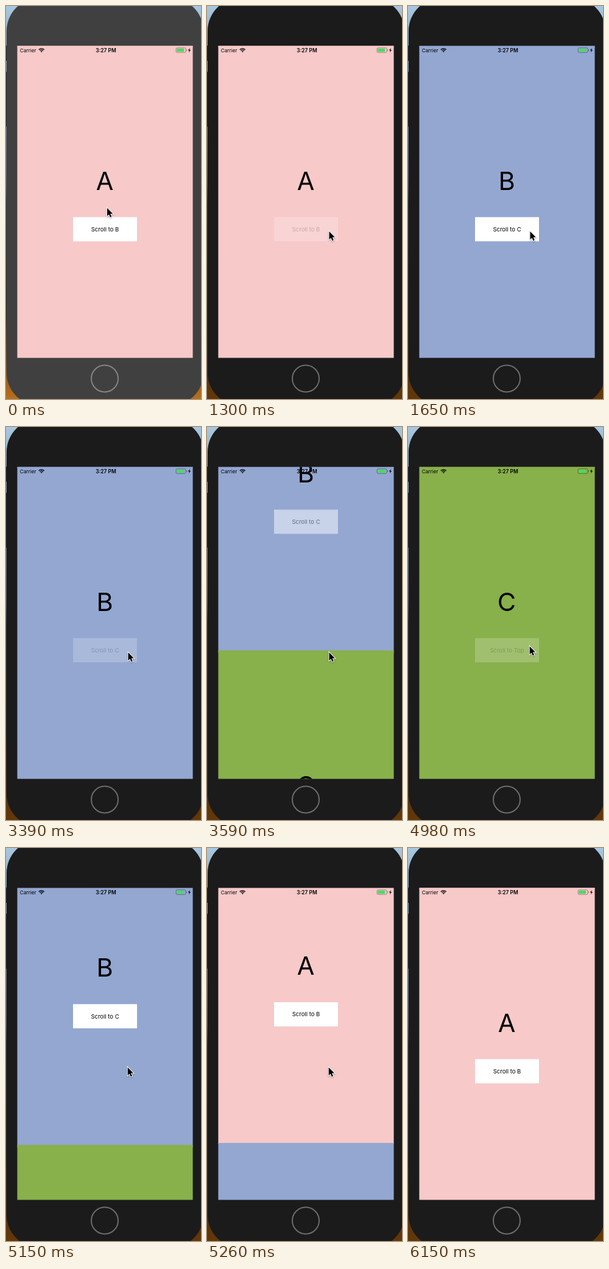
Write an HTML page with a canvas that moves like this. It is 320 px wide and 645 px high and loops after 6990 ms.

```html
<!DOCTYPE html>
<html lang="en">
<head>
<meta charset="utf-8">
<title>Scroll to page</title>
<style>
html, body { margin: 0; width: 100%; height: 100%; overflow: hidden; background: #1b1b1b; }
canvas { display: block; width: 320px; height: 645px; }
</style>
</head>
<body>
<canvas id="stage"></canvas>
<script>
const W = 320, H = 645, LOOP = 6990;
const STEP = 60;
const SCROLL_MS = 322;
const SCREEN = { x: 18.5, y: 65.5, w: 288, h: 512 };
const MID = SCREEN.x + SCREEN.w / 2;
const FONT = 'Inter, "Liberation Sans", sans-serif';

const PAGES = [
  { letter: 'A', label: 'Scroll to B', color: '#f7c9c9' },
  { letter: 'B', label: 'Scroll to C', color: '#93a7d1' },
  { letter: 'C', label: 'Scroll to Top', color: '#88b04b' }
];

// Tapping a page's button scrolls to the next page, wrapping at the end
const TAPS = [
  { press: 1300, end: 1650 },
  { press: 3390, end: 3730 },
  { press: 4980, end: 5320 }
];

const POINTER_START = { x: 166, y: 331.5 };
const POINTER_GONE = 6150;
const MOVES = [
  { start: 0, end: 640, x: 200.5, y: 364 },
  { start: 760, end: 940, x: 200.5, y: 370 },
  { start: 4090, end: 4210, x: 189, y: 395.5, power: 0.6 },
  { start: 4210, end: 4450, x: 199.7, y: 360 },
  { start: 5740, end: 6090, x: 298, y: 618.5, power: 1.7 }
];

const ARROW = new Path2D('M0 0V13.2L3 10.4 5 15.2 7.3 14.2 5.2 9.6H9.3Z');
const BOLT = new Path2D('M302 68.8L298.8 73H300.8L299.8 76.4 303 71.9H301Z');

const canvas = document.getElementById('stage');
const ctx = canvas.getContext('2d');
const dpr = window.devicePixelRatio || 1;
canvas.width = W * dpr;
canvas.height = H * dpr;

const clamp = v => Math.max(0, Math.min(1, v));
const lerp = (a, b, k) => a + (b - a) * k;
const smooth = k => k * k * (3 - 2 * k);

// Motion advances in even steps that land exactly on its end
function progress(t, start, end) {
  const left = Math.max(0, Math.ceil((end - t) / STEP - 0.05)) * STEP;
  return clamp((end - left - start) / (end - start));
}

function scrollAt(t) {
  return TAPS.reduce((pos, { end }, i) => {
    const next = (i + 1) % PAGES.length;
    return lerp(pos, next, smooth(progress(t, end - SCROLL_MS, end)));
  }, 0);
}

function buttonAlpha(page, t) {
  const { press } = TAPS[page];
  return t < press ? 1 : lerp(0.2, 1, clamp((t - press - 110) / 250));
}

function pointerAt(t) {
  return MOVES.reduce((p, { start, end, x, y, power = 1 }) => {
    const k = progress(t, start, end) ** power;
    return { x: lerp(p.x, x, k), y: lerp(p.y, y, k) };
  }, POINTER_START);
}

function rect(color, x, y, w, h) {
  ctx.fillStyle = color;
  ctx.fillRect(x, y, w, h);
}

function text(str, x, y, size, align = 'center', weight = 400) {
  ctx.font = `${weight} ${size}px ${FONT}`;
  ctx.textAlign = align;
  ctx.fillStyle = '#000';
  ctx.fillText(str, x, y);
}

function drawBackdrop(dark) {
  const g = ctx.createLinearGradient(0, 0, 0, H);
  g.addColorStop(0, '#a8c8e0');
  g.addColorStop(0.1, '#8fa5bc');
  g.addColorStop(0.45, '#5c5f6c');
  g.addColorStop(0.5, '#35343a');
  g.addColorStop(0.78, '#332a22');
  g.addColorStop(1, dark ? '#643808' : '#b8701a');
  rect(g, 0, 0, W, H);
  rect('#24252a', 0, 65, 2, 25);
  rect('#24252a', 0, 108, 2, 90);
}

function drawDevice(dark) {
  ctx.fillStyle = dark ? '#1b1b1b' : '#404040';
  ctx.beginPath();
  ctx.roundRect(1, -13, 323, 669, 54);
  ctx.fill();
  ctx.strokeStyle = dark ? '#6c6c6c' : '#858585';
  ctx.lineWidth = 2;
  ctx.beginPath();
  ctx.arc(162, 611.5, 22, 0, 7);
  ctx.stroke();
}

function drawPage(i, top, t) {
  const page = PAGES[i];
  // Bleeds past the clip so the screen edge is blended only once
  rect(page.color, 0, i ? top : top - 2, W, SCREEN.h + 4);
  text(page.letter, MID - 0.5, top + 236.2, 41.5);
  ctx.globalAlpha = buttonAlpha(i, t);
  rect('#fff', 110, top + 281, 105, 39.7);
  text(page.label, MID, top + 304.4, 9.5);
  ctx.globalAlpha = 1;
}

function drawWifi(x, y) {
  const arc = r => ctx.arc(x, y, r, -Math.PI * 0.76, -Math.PI * 0.24);
  ctx.strokeStyle = ctx.fillStyle = '#000';
  ctx.lineWidth = 1.3;
  for (const r of [3.8, 6.2]) {
    ctx.beginPath();
    arc(r);
    ctx.stroke();
  }
  ctx.beginPath();
  ctx.moveTo(x, y);
  arc(2.2);
  ctx.fill();
}

function drawBattery() {
  ctx.strokeStyle = 'rgba(0,0,0,.45)';
  ctx.lineWidth = 0.8;
  ctx.beginPath();
  ctx.roundRect(279, 68.7, 16, 7.6, 1.8);
  ctx.stroke();
  rect('#4cd964', 280.2, 69.9, 11.8, 5.2);
  rect('rgba(0,0,0,.45)', 295.9, 71.3, 0.9, 2.4);
  ctx.fillStyle = '#000';
  ctx.fill(BOLT);
}

function drawStatus() {
  text('Carrier', 22.7, 75.7, 8.2, 'left');
  text('3:27 PM', 164, 75.7, 8.4, 'center', 600);
  drawWifi(58.3, 76);
  drawBattery();
}

function drawPointer({ x, y }) {
  ctx.save();
  ctx.translate(x, y);
  ctx.shadowColor = 'rgba(0,0,0,.35)';
  ctx.shadowBlur = 2 * dpr;
  ctx.shadowOffsetY = dpr;
  ctx.strokeStyle = '#fff';
  ctx.lineWidth = 2;
  ctx.stroke(ARROW);
  ctx.shadowColor = 'transparent';
  ctx.fillStyle = '#000';
  ctx.fill(ARROW);
  ctx.restore();
}

function draw(t) {
  const dark = t >= TAPS[0].press;
  ctx.setTransform(dpr, 0, 0, dpr, 0, 0);
  drawBackdrop(dark);
  drawDevice(dark);

  ctx.save();
  ctx.beginPath();
  ctx.rect(SCREEN.x, SCREEN.y, SCREEN.w, SCREEN.h);
  ctx.clip();
  const pos = scrollAt(t);
  PAGES.forEach((_, i) => {
    if (Math.abs(i - pos) >= 1) return;
    const top = SCREEN.y + (i - pos) * SCREEN.h;
    // The page in full view also covers the half pixel above it
    if (i === pos) rect(PAGES[i].color, 0, top - 2, W, 4);
    drawPage(i, top, t);
  });
  drawStatus();
  ctx.restore();

  if (t < POINTER_GONE) drawPointer(pointerAt(t));
}

const begin = performance.now();
function tick() {
  draw((performance.now() - begin) % LOOP);
  requestAnimationFrame(tick);
}
tick();
</script>
</body>
</html>
```
